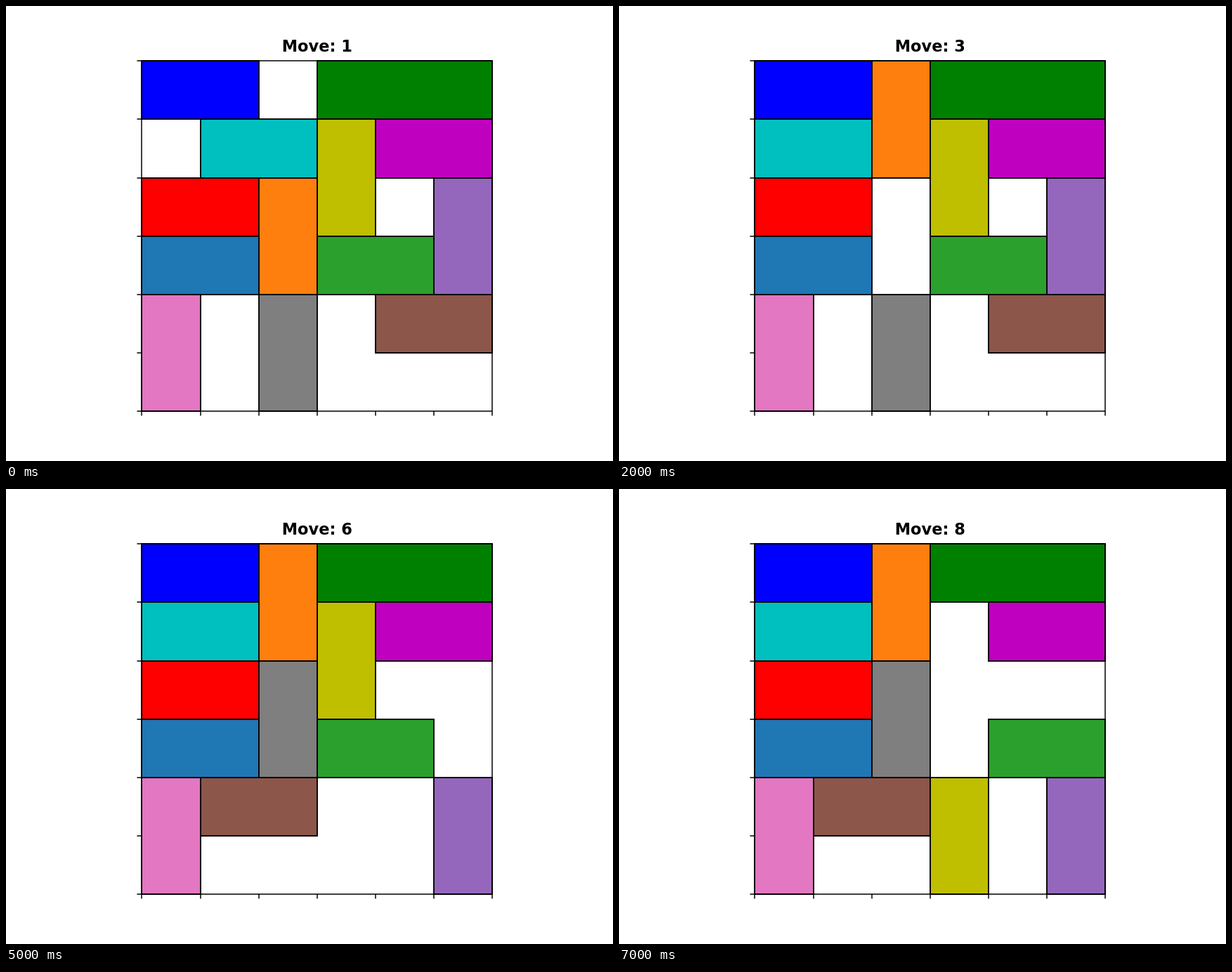
An HTML page for the animation above (8000 ms loop, 864 by 648 pixels).

```html
<!DOCTYPE html>
<html lang="en">
<head>
<meta charset="utf-8">
<title>Sliding blocks</title>
<style>
  html, body { margin: 0; width: 100%; height: 100%; overflow: hidden; background: #fff; }
  svg { display: block; width: 864px; height: 648px; }
  text { font: bold 22.5px "DejaVu Sans", sans-serif; text-anchor: middle; }
  .block { stroke: #000; stroke-width: 1.875; }
  .axis { fill: none; stroke: #000; stroke-width: 1.5; }
</style>
</head>
<body>
<svg viewBox="0 0 864 648">
  <text id="title" x="442.8" y="65">Move: 1</text>
  <g id="board"></g>
  <path id="axis" class="axis"/>
</svg>
<script>
const CELL = 83.16, STEP = 1000, MOVES = 8;
const gx = i => Math.round(193.4 + CELL * i);
const gy = j => Math.round(78.2 + CELL * j);

// colour, column, row, width, height, then the move: number, dx, dy
const blocks = [
  ['#0000ff', 0, 0, 2, 1],
  ['#008000', 3, 0, 3, 1],
  ['#00bfbf', 1, 1, 2, 1, 2, -1, 0],
  ['#bfbf00', 3, 1, 1, 2, 8, 0, 3],
  ['#bf00bf', 4, 1, 2, 1],
  ['#ff0000', 0, 2, 2, 1],
  ['#ff7f0e', 2, 2, 1, 2, 3, 0, -2],
  ['#9467bd', 5, 2, 1, 2, 6, 0, 2],
  ['#1f77b4', 0, 3, 2, 1],
  ['#2ca02c', 3, 3, 2, 1, 7, 1, 0],
  ['#e377c2', 0, 4, 1, 2],
  ['#7f7f7f', 2, 4, 1, 2, 4, 0, -2],
  ['#8c564b', 4, 4, 2, 1, 5, -3, 0]
];

const board = document.getElementById('board');
const title = document.getElementById('title');

const rects = blocks.map(([color]) => {
  const r = document.createElementNS('http://www.w3.org/2000/svg', 'rect');
  r.setAttribute('class', 'block');
  r.setAttribute('fill', color);
  return board.appendChild(r);
});

let path = `M${gx(0)} ${gy(0)}H${gx(6)}V${gy(6)}H${gx(0)}Z`;
for (let i = 0; i <= 6; i++) {
  path += `M${gx(0)} ${gy(i)}h-6.56M${gx(i)} ${gy(6)}v6.56`;
}
document.getElementById('axis').setAttribute('d', path);

function draw(move) {
  title.textContent = 'Move: ' + move;
  blocks.forEach(([, col, row, w, h, at = Infinity, dx, dy], k) => {
    const x = col + (move >= at ? dx : 0);
    const y = row + (move >= at ? dy : 0);
    const box = { x: gx(x), y: gy(y), width: gx(x + w) - gx(x), height: gy(y + h) - gy(y) };
    for (const name in box) rects[k].setAttribute(name, box[name]);
  });
}

let shown = 1;
function tick() {
  const move = Math.floor(performance.now() / STEP) % MOVES + 1;
  if (move !== shown) draw(shown = move);
  requestAnimationFrame(tick);
}
draw(shown);
tick();
</script>
</body>
</html>
```
